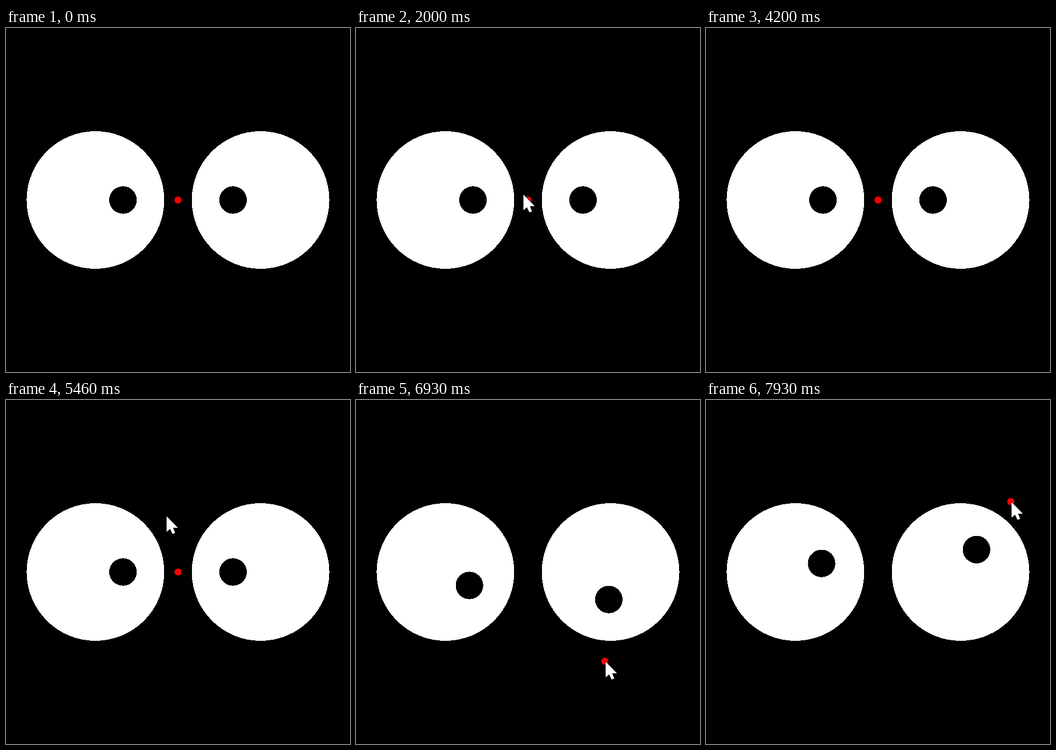
Animation of 640 by 640 pixels, one loop 8000 ms. Source, as an HTML page:

```html
<!DOCTYPE html>
<html lang="en">
<head>
<meta charset="utf-8">
<title>Watching eyes</title>
<style>
  html, body { margin: 0; height: 100%; overflow: hidden; background: #000; }
  svg { display: block; width: 100%; height: 100%; }
  .eye, .pupil { shape-rendering: crispEdges; }
</style>
</head>
<body>
<svg viewBox="0 0 640 640">
  <g fill="#fff">
    <circle class="eye" cx="166.4" cy="320" r="128"/>
    <circle class="eye" cx="473.6" cy="320" r="128"/>
  </g>
  <circle class="pupil" r="25.6"/>
  <circle class="pupil" r="25.6"/>
  <circle id="dot" r="6.6" fill="#f00"/>
  <path id="cursor" d="M.5 1V30L7 24.5L11.5 34L16.5 32L12.5 22.5H21.5Z"
        fill="#fff" stroke="#000" stroke-width="1.5" paint-order="stroke"/>
</svg>
<script>
const LOOP = 8000, STEP = 1000 / 15;
const EYES = [166.4, 473.6], EYE_Y = 320, REACH = 51.2;

const linear = u => u;
const easeIn = u => u ** 1.7;
const easeOut = u => 1 - (1 - u) ** 2;

// Pointer moves, timed in steps; a bend pulls the path into a curve.
const enterBelow = { begin: 20, end: 30, from: [38, 532], to: [311, 309], ease: easeOut };
const drift = { begin: 33, end: 49, from: [312, 310], to: [315, 338], ease: easeIn };
const leave = { begin: 51, end: 54, from: [315, 338], to: [321, 312], ease: linear };
const enterAbove = { begin: 79, end: 87, from: [266, 58], to: [319, 316], ease: easeOut };
const swingDown = { begin: 92, end: 104, from: [319, 316], bend: [312, 502], to: [464, 486], ease: easeIn };
const swingUp = { begin: 104, end: 119, from: [464, 486], bend: [676, 422], to: [568, 189], ease: linear };
const moves = [enterBelow, drift, leave, enterAbove, swingDown, swingUp];

const pupils = document.querySelectorAll(".pupil");
const dot = document.getElementById("dot");
const cursor = document.getElementById("cursor");

function place(element, [x, y]) {
  element.setAttribute("transform", `translate(${x} ${y})`);
}

function pointerAt(step) {
  const move = moves.findLast(m => m.begin <= step);
  const gone = step > leave.end && step < enterAbove.begin;
  if (!move || gone) return null;
  const { begin, end, from, to, bend, ease } = move;
  const u = ease(Math.min((step - begin) / (end - begin), 1));
  return from.map((a, axis) => {
    const b = to[axis], c = bend ? bend[axis] : (a + b) / 2;
    return a * (1 - u) ** 2 + 2 * c * u * (1 - u) + b * u * u;
  });
}

function targetAt(step) {
  if (step < swingDown.begin) return [320, 320];
  const lag = step < swingDown.begin + 3 ? 1 : 0;
  const [x, y] = pointerAt(step - lag);
  return [x - 1, y];
}

function draw(time) {
  const step = Math.floor((time % LOOP + 7) / STEP) % 120;
  const pointer = pointerAt(step);
  cursor.style.display = pointer ? "" : "none";
  if (pointer) place(cursor, pointer);

  const target = targetAt(step);
  place(dot, target);
  EYES.forEach((x, i) => {
    const angle = Math.atan2(target[1] - EYE_Y, target[0] - x);
    place(pupils[i], [x + REACH * Math.cos(angle), EYE_Y + REACH * Math.sin(angle)]);
  });
}

const start = performance.now();
function tick() {
  draw(performance.now() - start);
  requestAnimationFrame(tick);
}
tick();
</script>
</body>
</html>
```
